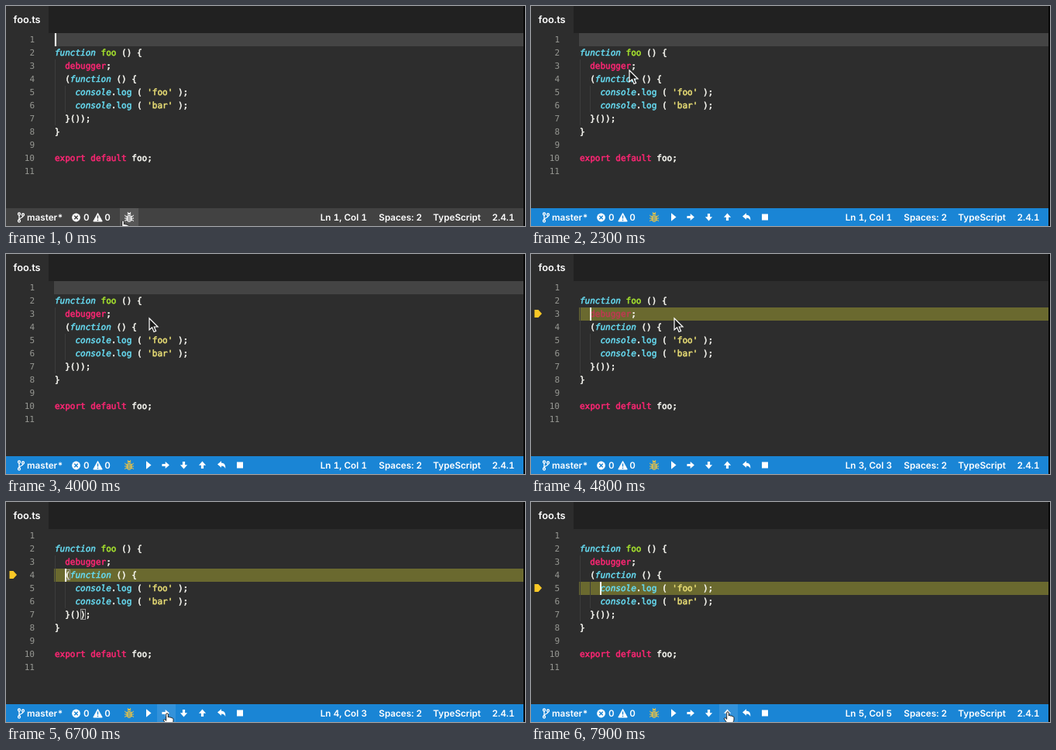
An HTML page for the animation above (8 s loop, 670 by 284 pixels).

```html
<!DOCTYPE html>
<html lang="en">
<head>
<meta charset="utf-8">
<title>Debugging foo.ts</title>
<style>
html, body { margin: 0; width: 100%; height: 100%; overflow: hidden; background: #2d2d2d; }
svg { display: block; width: 670px; height: 284px; }
text { white-space: pre; text-rendering: geometricPrecision; }
.code text { font: 11px "DejaVu Sans Mono", monospace; stroke-width: .55px; }
.num text { font: 11px "DejaVu Sans Mono", monospace; fill: #969792; text-anchor: end; }
.w { fill: #f8f8f2; stroke: #f8f8f2; }
.r { fill: #f92672; stroke: #f92672; }
.b { fill: #66d9ef; stroke: #66d9ef; }
.g { fill: #a6e22e; stroke: #a6e22e; }
.y { fill: #e6db74; stroke: #e6db74; }
.code .i { font-style: italic; }
.dim { fill: #bd3a52; stroke: #bd3a52; }
.ui { font: 600 11.7px Inter, sans-serif; font-variant-numeric: tabular-nums; fill: #fff; }
.end { text-anchor: end; }
.guide { stroke: #3c3c3c; }
.match { fill: none; stroke: #999; }
</style>
</head>
<body>
<svg viewBox="0 0 670 284">
  <rect width="670" height="284" fill="#2d2d2d"/>
  <rect x="55" width="615" height="35" fill="#212121"/>
  <text class="ui" x="9.5" y="21.5" style="font-size:12.8px">foo.ts</text>

  <rect id="band" x="62" width="606" height="17"/>
  <path class="guide" d="M63.5 69V154M76.5 103V137"/>
  <g id="nums" class="num"></g>
  <g id="code" class="code"></g>
  <g id="match" class="match">
    <rect x="76.5" y="87.5" width="6" height="13"/>
    <rect x="96.5" y="138.5" width="6" height="13"/>
  </g>
  <path id="marker" fill="#f9c826" d="M4.5-5H9.5L14 0L9.5 5H4.5Z"/>
  <rect id="caret" width="2" height="17" fill="#f8f8f0"/>

  <rect id="bar" y="261" width="668" height="23"/>
  <rect id="hover" y="261" width="24" height="23" fill="#fff" fill-opacity=".11"/>
  <g fill="none" stroke="#fff" stroke-width="1.3">
    <circle cx="17" cy="268.5" r="1.5"/>
    <circle cx="17" cy="277.5" r="1.5"/>
    <circle cx="22" cy="269.5" r="1.5"/>
    <path d="M17 270V276M22 271C22 274 17 273 17 276"/>
  </g>
  <circle cx="90.5" cy="273" r="5.4" fill="#fff"/>
  <path class="cut" d="M88.3 270.8L92.7 275.2M92.7 270.8L88.3 275.2" stroke-width="1.5"/>
  <path d="M118.5 267.5L124.2 278H112.8Z" fill="#fff" stroke="#fff" stroke-linejoin="round"/>
  <path class="cut" d="M118.5 270.5V274.5M118.5 275.8V277.2" stroke-width="1.4"/>
  <g class="ui">
    <text x="27" y="277">master*</text>
    <text x="100" y="277">0</text>
    <text x="127.3" y="277">0</text>
    <text id="pos" class="end" x="466" y="277"></text>
    <text class="end" x="537" y="277">Spaces: 2</text>
    <text class="end" x="613" y="277">TypeScript</text>
    <text class="end" x="656.5" y="277">2.4.1</text>
  </g>
  <g id="bug" transform="translate(159 272.5)">
    <rect x="-3.3" y="-2.5" width="6.6" height="8.7" rx="3.1"/>
    <path stroke="none" d="M-2.4-3.2C-2.4-6.2 2.4-6.2 2.4-3.2Z"/>
    <path fill="none" stroke-width="1" d="M-3-1H-4.7L-5.5-2.7M-3 1.5H-6M-3 3.8H-4.7L-5.5 5.5M3-1H4.7L5.5-2.7M3 1.5H6M3 3.8H4.7L5.5 5.5M-1-5L-2-6.5M1-5L2-6.5"/>
    <path class="cut" stroke-width=".8" d="M-1-1.5V5.5M1-1.5V5.5"/>
  </g>
  <g id="tools" fill="#fff">
    <path d="M181 267.2L187.5 272.5L181 277.8Z"/>
    <path id="arrow" d="M-4.6-1.6H-.3V-4.6L4.9 0L-.3 4.6V1.6H-4.6Z" transform="translate(206 272.5)"/>
    <use href="#arrow" transform="translate(229.5 272.5) rotate(90) translate(-206 -272.5)"/>
    <use href="#arrow" transform="translate(253.5 272.5) rotate(-90) translate(-206 -272.5)"/>
    <path d="M273 271.5L278 267.3V269.8C282 269.8 283.7 272.5 283.2 277C282 274.2 280.5 273.4 278 273.4V275.8Z"/>
    <rect x="298" y="268.5" width="8" height="8"/>
  </g>

  <rect x="668" width="2" height="284" fill="#060606"/>
  <path id="pointer" d="M0 0V15L3.5 11.8L6 17.5L8.6 16.4L6.2 11H11Z" fill="#1c1c1c" stroke="#fff" stroke-width="1.2"/>
  <path id="hand" fill="#fff" stroke="#111" stroke-width=".9" d="M-1.3 1C-1.3-.6 1.3-.6 1.3 1V5C2 4.2 3.5 4.4 3.6 5.3C4.5 4.7 5.8 5 5.9 6C7 5.6 8 6.2 8 7.4V10C8 12 6.5 13 6.5 15H-.8C-1 13.5-3.5 11-4.5 9C-5 7.8-3.5 7.2-2.5 8.2L-1.3 9.3Z"/>
</svg>
<script>
const LOOP = 8000, START = 800, COL = 6.62, LEFT = 63, ROW = 17;
const $ = id => document.getElementById(id);
const colX = col => LEFT + (col - 1) * COL;
const rowY = line => 35 + (line - 1) * ROW;

function addText(parent, x, line, str, cls = '') {
  const t = document.createElementNS('http://www.w3.org/2000/svg', 'text');
  t.setAttribute('x', x);
  t.setAttribute('y', rowY(line) + 11.6);
  t.setAttribute('class', cls);
  t.textContent = str;
  parent.append(t);
  return t;
}

// line, column, text, class
const tokens = [
  [2, 1, 'function', 'b i'], [2, 10, 'foo', 'g'], [2, 14, '() {', 'w'],
  [3, 3, 'debugger', 'r'], [3, 11, ';', 'w'],
  [4, 3, '(', 'w'], [4, 4, 'function', 'b i'], [4, 13, '() {', 'w'],
  [7, 3, '}());', 'w'], [8, 1, '}', 'w'],
  [10, 1, 'export default', 'r'], [10, 16, 'foo;', 'w']
];
['foo', 'bar'].forEach((word, i) => tokens.push(
  [5 + i, 5, 'console', 'b i'], [5 + i, 12, '.', 'w'], [5 + i, 13, 'log', 'b'],
  [5 + i, 17, '(', 'w'], [5 + i, 19, `'${word}'`, 'y'], [5 + i, 25, ');', 'w']
));
const drawn = tokens.map(([line, col, str, cls]) => addText($('code'), colX(col), line, str, cls));
const keyword = drawn[3];
for (let n = 1; n <= 11; n++) addText($('nums'), 37, n, n);

// time, line, column
const stops = [[0, 1, 1], [4700, 3, 3], [6500, 4, 3], [7450, 5, 5]];

// time, x, y of the mouse tip
const path = [
  [0, 151, 277], [200, 151, 277], [600, 160, 275], [1400, 160, 275],
  [2100, 127, 83], [2700, 127, 83], [3400, 185, 83], [4800, 185, 83],
  [5450, 205, 275], [6000, 205, 275], [6400, 208, 273], [7450, 208, 273],
  [7800, 254, 271], [8000, 254, 271]
];

function mouseAt(t) {
  const i = path.findIndex(p => p[0] > t);
  const [t0, x0, y0] = path[i - 1], [t1, x1, y1] = path[i];
  const u = (t - t0) / (t1 - t0), e = u * u * (3 - 2 * u);
  return [x0 + (x1 - x0) * e, y0 + (y1 - y0) * e];
}

const show = (el, on) => el.setAttribute('visibility', on ? 'visible' : 'hidden');

function render(t) {
  const [since, line, col] = stops.filter(s => s[0] <= t).pop();
  const debug = t >= START, paused = line > 1;

  $('band').setAttribute('y', rowY(line));
  $('band').setAttribute('fill', paused ? '#6a692f' : '#444');
  $('marker').setAttribute('transform', `translate(0 ${rowY(line) + 8})`);
  show($('marker'), paused);
  show($('match'), line === 4);
  keyword.setAttribute('class', line === 3 ? 'dim' : 'r');
  $('caret').setAttribute('x', Math.round(colX(col)));
  $('caret').setAttribute('y', rowY(line));
  show($('caret'), (paused || !debug) && (t - since) % 1000 < 500);
  $('pos').textContent = `Ln ${line}, Col ${col}`;

  const barColor = debug ? '#1a85d5' : '#424242';
  const bugColor = debug ? '#f0c541' : '#fff';
  $('bar').setAttribute('fill', barColor);
  $('bug').setAttribute('fill', bugColor);
  $('bug').setAttribute('stroke', bugColor);
  $('bug').setAttribute('stroke-width', 0);
  document.querySelectorAll('.cut').forEach(c => c.setAttribute('stroke', barColor));
  show($('tools'), debug);

  const [x, y] = mouseAt(t);
  const slot = Math.floor((x - 147) / 24);
  const over = y > 262 && slot >= 0;
  $('hover').setAttribute('x', 147 + slot * 24);
  show($('hover'), over);
  for (const [id, on] of [['hand', over], ['pointer', !over]]) {
    $(id).setAttribute('transform', `translate(${x} ${y})`);
    show($(id), on);
  }
}

const begin = performance.now();
function tick() {
  render((performance.now() - begin) % LOOP);
  requestAnimationFrame(tick);
}
tick();
</script>
</body>
</html>
```
